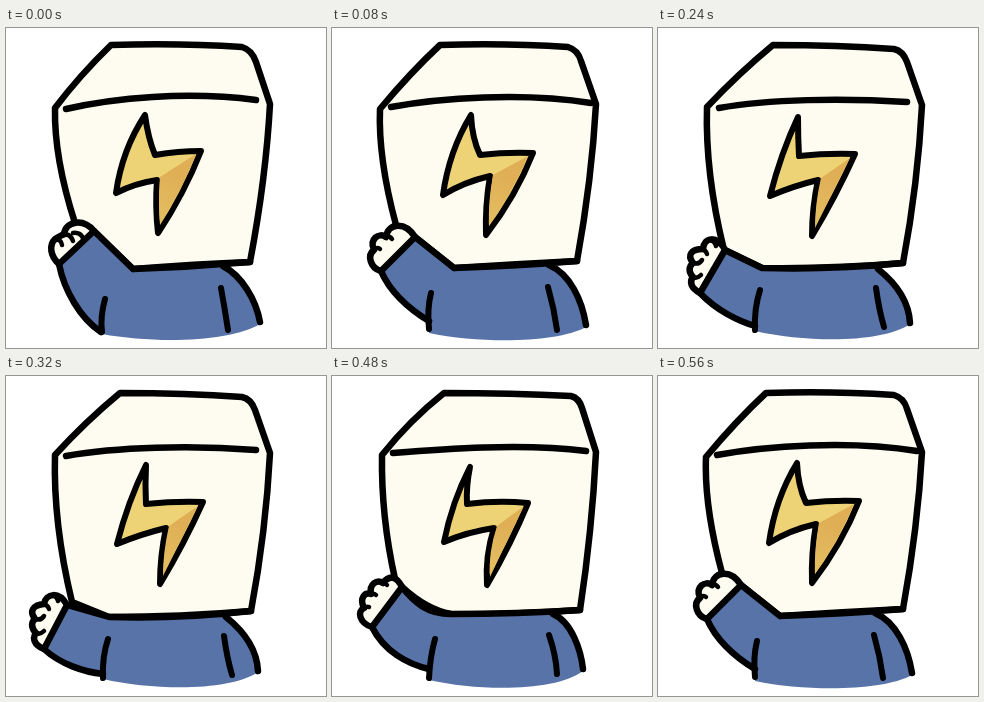
Recreate the animation shown at these times as an HTML page without scripts. Size 320x320 px, loop 0.64 s.

```html
<!DOCTYPE html>
<html lang="en">
<head>
<meta charset="utf-8">
<title>Waving box</title>
<style>
html, body { margin: 0; width: 100%; height: 100%; overflow: hidden; background: #fff; }
svg { display: block; width: 100%; height: 100%; }
path { fill: none; stroke: #000; stroke-width: 6.5; stroke-linecap: round; stroke-linejoin: round; }
.cream { fill: #fefcf0; }
.coat { fill: #5873a8; stroke: none; }
.bolt { fill: #edd276; stroke-width: 6; }
.shade { fill: url(#amber); stroke: none; }
.fold { stroke-width: 6; }
.finger { stroke-width: 4.5; }

/* eight equal beats: out to the low pose and back */
.pose { visibility: hidden; animation: 640ms step-end infinite; }
.p1 { animation-name: p1; }
.p2 { animation-name: p2; }
.p3 { animation-name: p3; }
.p4 { animation-name: p4; }
.p5 { animation-name: p5; }
@keyframes p1 { 0% { visibility: visible } 12.5%, 100% { visibility: hidden } }
@keyframes p2 { 0%, 25% { visibility: hidden } 12.5%, 87.5%, 100% { visibility: visible } }
@keyframes p3 { 0%, 37.5%, 87.5%, 100% { visibility: hidden } 25%, 75% { visibility: visible } }
@keyframes p4 { 0%, 50%, 75%, 100% { visibility: hidden } 37.5%, 62.5% { visibility: visible } }
@keyframes p5 { 0%, 62.5%, 100% { visibility: hidden } 50% { visibility: visible } }
</style>
</head>
<body>
<svg viewBox="0 0 320 320">
  <defs>
    <linearGradient id="amber" gradientUnits="userSpaceOnUse" x1="182" y1="142" x2="158" y2="188">
      <stop offset=".15" stop-color="#dfae55"/>
      <stop offset="1" stop-color="#e4bc60"/>
    </linearGradient>
  </defs>

  <!-- hand highest -->
  <g class="pose p1">
    <path class="cream" d="M105 17Q175 15 236 19Q246 22 250 34L264 76Q260 150 244 234Q190 236 127 241L88 203L69 195Q48 130 49 80Q74 47 105 17Z"/>
    <path d="M60 81C108 70 180 63 250 72"/>
    <path class="bolt" d="M139 87Q142 110 149 127Q172 123 195 123Q178 166 152 205Q149 178 151 152Q130 155 110 165Q116 122 139 87Z"/>
    <path class="shade" d="M190 126Q175 165 154 197Q152 175 154 149Z"/>
    <path class="coat" d="M88 203L127 241L217 238C236 248 250 272 254 296C225 314 150 316 96 306C72 292 58 262 53 236Z"/>
    <path d="M217 238C236 248 250 272 254 294M127 241Q185 239 244 234M88 203L127 241"/>
    <path d="M53 236C58 262 74 290 95 304"/>
    <path class="cream" d="M53 236C44 228 43 217 49 211C53 208 55 208 58 206C60 193 77 190 88 203Z"/>
    <path class="finger" d="M50 212Q55 211 56 217M58 207Q64 205 67 213M67 205Q74 204 77 210"/>
    <path class="fold" d="M99 271Q94 289 96 304M215 260Q219 282 222 302"/>
  </g>

  <g class="pose p2">
    <path class="cream" d="M108 17Q175 15 236 19Q246 22 249 33L264 76Q260 150 245 233Q185 236 122 240L83 209L64 197Q46 130 48 81Q78 45 108 17Z"/>
    <path d="M59 79C108 70 190 64 259 75"/>
    <path class="bolt" d="M139 87Q140 110 148 127Q174 124 201 125Q184 168 154 207Q153 178 158 148Q132 154 111 167Q117 123 139 87Z"/>
    <path class="shade" d="M196 128Q180 166 157 198Q156 174 161 147Z"/>
    <path class="coat" d="M83 209L122 240L217 237C238 246 250 272 254 299C225 315 150 316 97 305V292C75 280 57 262 49 243Z"/>
    <path d="M217 237C238 246 250 272 254 297M122 240Q185 238 245 233M83 209L122 240"/>
    <path d="M49 243C57 262 75 280 97 293"/>
    <path class="cream" d="M49 243C38 240 35 227 42 222C37 211 47 204 54 209C56 195 73 193 83 209Z"/>
    <path class="finger" d="M43 221Q46 219 48 221M54 208Q58 208 60 211"/>
    <path class="fold" d="M99 265Q95 281 97 301M216 259Q222 280 225 302"/>
  </g>

  <g class="pose p3">
    <path class="cream" d="M112 17Q180 17 239 20Q247 22 250 32L264 76Q260 155 248 234Q180 239 119 238Q95 234 70 211L63 203Q49 140 50 79Q77 45 112 17Z"/>
    <path d="M61 77C110 73 190 67 254 75"/>
    <path class="bolt" d="M138 91Q134 111 135 128Q166 124 196 127Q179 168 155 209Q153 180 162 152Q135 156 112 166Q120 126 138 91Z"/>
    <path class="shade" d="M192 130Q175 165 158 201Q156 177 165 150Z"/>
    <path class="coat" d="M70 211C82 226 95 238 119 238L221 238C240 248 249 275 251 295C225 315 150 316 97 304V293C75 288 52 275 40 251Z"/>
    <path d="M221 238C240 246 249 275 251 293M70 211C82 226 95 238 119 238Q185 238 248 234"/>
    <path d="M40 251C52 275 75 288 97 293"/>
    <path class="cream" d="M40 251C27 247 25 235 32 232C27 222 33 216 39 218C37 208 45 203 51 207C58 198 65 201 70 211Z"/>
    <path class="finger" d="M32 232Q35 230 37 231M39 218Q42 217 44 219M51 207Q53 207 55 209"/>
    <path class="fold" d="M103 263Q98 281 97 302M217 259Q224 279 225 298"/>
  </g>

  <g class="pose p4">
    <path class="cream" d="M115 17Q180 17 236 21Q245 23 249 34L264 77Q260 155 245 235Q175 241 104 240L66 222Q47 145 49 79Q80 46 115 17Z"/>
    <path d="M61 80C110 71 185 70 249 74"/>
    <path class="bolt" d="M140 89Q140 109 141 128Q169 125 197 126Q178 168 154 208Q154 180 160 152Q135 158 112 168Q123 125 140 89Z"/>
    <path class="shade" d="M192 130Q174 166 157 200Q157 176 163 150Z"/>
    <path class="coat" d="M67 222L104 240L220 239C240 256 251 275 252 296C225 315 150 315 97 303V298C80 293 58 282 42 265Z"/>
    <path d="M220 241C240 257 251 275 252 295M67 222L104 240Q175 242 245 235"/>
    <path d="M42 265C58 282 80 293 97 298"/>
    <path class="cream" d="M42 265C33 260 31 254 35 249C30 244 31 238 35 235C29 227 33 221 45 221C46 209 59 207 67 222Z"/>
    <path class="finger" d="M35 249Q39 251 43 247M35 235Q41 237 44 232M43 221Q48 222 49 226M52 212Q57 213 58 218"/>
    <path class="fold" d="M102 262Q96 281 97 302M218 260Q221 282 226 299"/>
  </g>

  <!-- hand lowest -->
  <g class="pose p5">
    <path class="cream" d="M114 17Q180 17 236 21Q245 23 249 34L264 77Q260 155 245 235Q175 241 103 241L66 226Q47 147 49 79Q79 46 114 17Z"/>
    <path d="M60 80C110 71 185 69 250 74"/>
    <path class="bolt" d="M140 89Q139 109 140 128Q169 125 197 126Q178 168 154 208Q154 180 160 152Q135 158 111 168Q122 125 140 89Z"/>
    <path class="shade" d="M192 130Q174 166 157 200Q157 176 163 150Z"/>
    <path class="coat" d="M61 229L103 241L220 239C240 256 251 275 252 296C225 315 150 315 97 303V298C78 296 54 288 38 273Z"/>
    <path d="M220 241C240 257 251 275 252 295M61 229L103 241Q175 243 245 235"/>
    <path d="M38 273C54 288 78 296 97 298"/>
    <path class="cream" d="M38 273C28 269 26 262 30 257C25 252 25 246 29 243C23 235 27 229 38 228C40 217 53 215 61 229Z"/>
    <path class="finger" d="M30 257Q34 259 38 255M29 243Q35 245 38 240M37 228Q42 229 43 233M46 219Q51 220 52 225"/>
    <path class="fold" d="M102 263Q96 281 97 302M218 260Q221 282 226 299"/>
  </g>
</svg>
</body>
</html>
```
